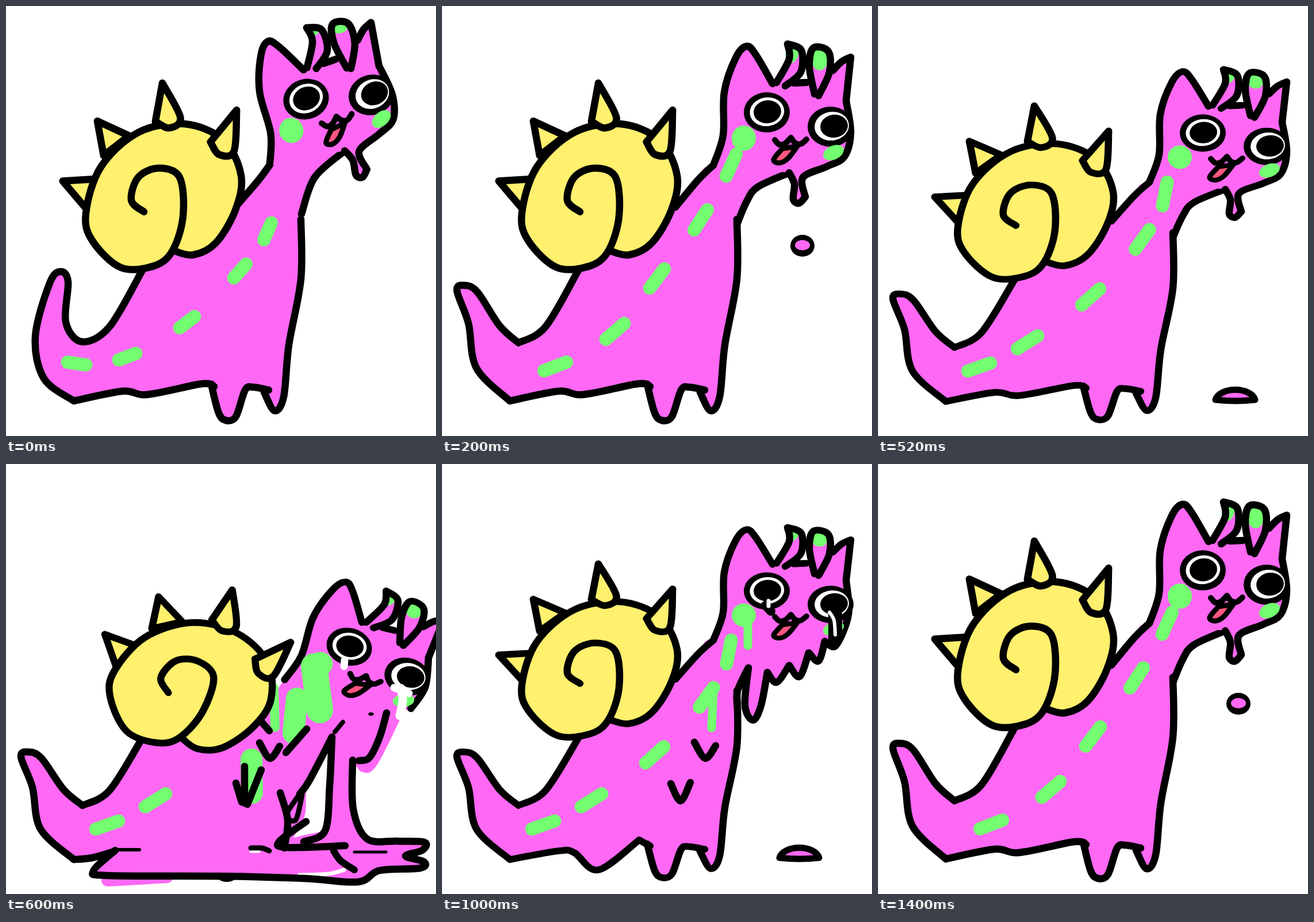
Recreate the animation shown at these times as an HTML page. Size 748 px wide and 748 px high, loop 1600 ms.

```html
<!DOCTYPE html>
<html lang="en">
<head>
<meta charset="utf-8">
<title>Melting snail cat</title>
<style>
  html, body { margin: 0; width: 100%; height: 100%; overflow: hidden; background: #fff; }
  svg { display: block; width: 100%; height: 100%; }
  .line { fill: none; stroke-linecap: round; stroke-linejoin: round; }
</style>
</head>
<body>
<svg id="stage" viewBox="0 0 748 748"></svg>
<script>
const INK = '#000', PINK = '#ff68f4', YELLOW = '#fff06e', GREEN = '#73ff70', RED = '#ff5780', WHITE = '#fff';

const points = s => s.trim().split(/\s+/).map(q => q.split(',').map(Number));

// Smooth curve through "x,y" points; "/" makes a sharp corner.
function curve(text) {
  let d = '', last;
  for (const part of text.split('/')) {
    const p = points(part);
    if (last) p.unshift(last); else d = 'M' + p[0];
    for (let i = 1; i < p.length; i++) {
      const b = p[i - 1], c = p[i], a = p[i - 2] || b, e = p[i + 1] || c;
      const h1 = b.map((v, k) => v + (c[k] - a[k]) / 6);
      const h2 = c.map((v, k) => v - (e[k] - b[k]) / 6);
      d += `C${h1} ${h2} ${c}`;
    }
    last = p[p.length - 1];
  }
  return d;
}

const line = (s, w = 12.5, color = INK) =>
  `<path class="line" d="${curve(s)}" stroke="${color}" stroke-width="${w}"/>`;
const lines = list => list.map(s => line(s)).join('');
const blob = (s, color) => `<path d="${curve(s)}Z" fill="${color}"/>`;
const smear = (s, w) => line(s, w, GREEN);
const oval = (x, y, rx, ry, color, turn = 0) =>
  `<ellipse cx="${x}" cy="${y}" rx="${rx}" ry="${ry}" fill="${color}" transform="rotate(${turn} ${x} ${y})"/>`;
const place = (transform, inner) => `<g transform="${transform}">${inner}</g>`;

// Sagging poses press the drawing towards the ground.
const PRESS = .93, FLOOR = 49;
const SAG = `translate(0 ${FLOOR}) scale(1 ${PRESS})`;
const mapY = (s, fn) => s.replace(/,([\d.]+)/g, (_, y) => ',' + fn(+y).toFixed(1));
const squash = s => mapY(s, y => y * PRESS + FLOOR);
const lift = s => mapY(s, y => (y - FLOOR) / PRESS);

// One dash centred on each point of the spine, lying along it.
function stripes(spine, length = 42) {
  const p = points(spine);
  const bend = (a, b, c) => a.map((v, k) => 3 * v - 3 * b[k] + c[k]);
  const path = [bend(p[0], p[1], p[2]), ...p, bend(...p.slice(-3).reverse())];
  return p.map(([x, y], i) => {
    const [a, b] = [path[i], path[i + 2]];
    const angle = Math.atan2(b[1] - a[1], b[0] - a[0]);
    const dx = Math.cos(angle) * length / 2, dy = Math.sin(angle) * length / 2;
    return smear(`${x - dx},${y - dy} ${x + dx},${y + dy}`, 23);
  }).join('');
}

// Shell: a spiral with four spikes spread evenly over its back.
function polar(degrees, r) {
  const a = degrees * Math.PI / 180;
  return [272 + r * Math.cos(a), 335 + r * Math.sin(a)];
}

function spike(i) {
  const front = i > 1;
  const [tx, ty] = polar(190 + 40 * i, front ? 201 : 176);
  const [bx, by] = polar(184 + 45 * i, front ? 138 : 122);
  const size = Math.hypot(tx - bx, ty - by), half = front ? 22 : 28;
  const ux = (tx - bx) / size, uy = (ty - by) / size;
  const at = (side, back) => `${bx - uy * side - ux * back},${by + ux * side - uy * back}`;
  const base = front ? `${at(half, 0)} ${at(0, 15)} ${at(-half, 0)}` : `${at(half, 0)}/${at(-half, 0)}`;
  const s = `${tx},${ty}/${base}/${tx},${ty}`;
  return blob(s, YELLOW) + line(s);
}

const rim = '308,365 290,425 258,452 200,455 150,408 139,360 165,280 230,220 310,205 378,233 409,295 399,355 365,412 325,433 290,425';
const spiral = '240,358 218,338 230,298 266,282 302,298 ' + rim;
const shell = spike(0) + spike(1) + blob(rim, YELLOW) + line(spiral) + spike(2) + spike(3);

// Head: one drawing, tilted differently in each pose.
const crown = [
  '703,165 711,89/695,97 680,112',
  '655,156 674,115 672,79 646,73 639,105 648,153',
  '634,133 612,134',
  '597,139 624,115 625,77 601,66/604,92 582,133',
  '575,135 546,85 530,70 511,90 491,150 489,225 472,277'
];
const drip = '604,290 613,310 611,336 621,343 632,332/628,298 670,279 700,262 711,220 703,165';

const eye = (x, y, look) => oval(x, y, 40, 35, INK) +
  oval(x + look / 3, y - 1, 30, 25, WHITE, -8) + oval(x + look, y - 1, 24, 20, INK, -8);

function head(tip, jaw = drip) {
  const outline = [jaw, ...crown];
  const lips = '579,233 587,241 597,239 607,229/614,238 624,240 634,232';
  const tongue = '592,248 577,267 587,273 602,265 618,244/592,248';
  return blob(outline.join('/'), PINK) +
    oval(609, 69 + tip * .7, 11, tip * .9, GREEN, 10) + oval(657, 74 + tip, 14, tip, GREEN) +
    lines(outline) + eye(565, 185, 1) + eye(676, 210, 6) +
    oval(525, 230, 21, 22, GREEN) + oval(681, 255, 19, 12, GREEN, -25) +
    blob(tongue, RED) + line(tongue, 9) + line(lips, 10);
}

const raisedTail = '237,460 180,558 132,584 104,550 108,480 95,462 76,482 51,575 66,648 118,687';
const limpTail = '237,460 180,558 133,586/100,556 62,498 40,486 26,495 46,552 60,630 118,687';
const flatBelly = '118,687 203,670 245,676 335,658 357,658';
const legs = [
  '357,658 370,708 383,721 400,714 416,668 430,663 457,668',
  '449,672 467,704 483,680 492,590 513,475 513,371'
];

function body(tail, front, back, belly = flatBelly) {
  const parts = [tail, belly, ...legs, front, back];
  return blob(parts.join('/'), PINK) + lines(parts) + line('357,658 362,662');
}

const slump = (front, belly) => body(limpTail, front, '472,277 445,303 406,350', belly);
const limpNeck = '513,380 530,340 549,315 604,290';
const sagSpine = '176,628 260,585 370,506 460,406 499,327';

const puddle = `<path class="line" d="M587 685A35 21 0 0 1 656 685Q622 689 587 685Z"
  style="fill:${PINK}" stroke="${INK}" stroke-width="11"/>`;

const upright = body(raisedTail, '514,362 537,298 589,252', '459,276 440,302 404,344') + shell +
  place('translate(-43 -23) rotate(-16.4 565 185)', head(9)) +
  stripes('123,622 211,610 315,550 407,461 455,392', 32);

const dripping = slump(limpNeck) + shell + head(19) +
  stripes('197,627 301,566 374,474 450,372 503,277') +
  oval(627, 417, 21, 19, INK) + oval(627, 416, 13, 9, PINK);

const sagging = place(SAG, slump(limpNeck) + shell + head(14)) + stripes(sagSpine) + puddle;

const runnyNeck = lift('514,425 514,395 533,354/527,420 541,446 555,420 566,362');
const runnyJaw = lift('566,362/582,380 604,350/622,370 638,328/655,343 666,308/685,316 707,262 703,202');
const bulge = lift('118,688 203,673 230,676 272,706 343,654/357,662');

const weeping = place(SAG, slump(runnyNeck, bulge) + shell + head(14, runnyJaw)) + stripes(sagSpine) +
  line('563,246 572,256', 16) + line('568,238 568,247', 7, WHITE) +
  line('684,262 684,306', 24) + line('674,258 682,272 684,297', 6, WHITE) +
  smear('532,280 532,316', 15) + smear('472,395 469,459', 15) +
  line('439,484 458,512 476,490') + line('398,556 415,586 432,554') + puddle;

function collapsed() {
  const tail = squash(limpTail);
  const pool = '190,672 152,708 180,716 375,717 520,721 612,727 650,707 720,703 727,692 695,682 724,672 728,658 680,656 628,652 604,600 603,515';
  const spill = '620,536 645,524 690,435/540,330/484,375/440,440/300,460/237,478';
  return line('177,724 280,718', 22, PINK) + blob([tail, '190,672', pool, spill].join('/'), PINK) +
    // gaps the melted body leaves open
    blob('566,480 563,560 556,638/522,645/500,650/520,610 526,550 566,480', WHITE) +
    line('510,715 560,713 588,706', 7, WHITE) + line('426,674 440,674', 5, WHITE) +
    lines([tail, '118,688 150,685 188,674', pool, '567,475 563,560 555,638 518,657',
      '567,475 528,550 511,574', '522,622 475,657 490,667 590,664', '477,572 490,620 484,668']) +
    line('511,574 488,610 504,619 515,576', 9) +
    line('190,671 232,671', 6) + line('426,668 445,668 458,673', 9) + line('606,675 661,675', 5) +
    line('570,673 582,690 606,706', 12) + oval(384, 719, 15, 8, INK) +
    place('translate(98.6 1) rotate(15.5) scale(1 .93)', head(14)
      .replace(line(drip), line('697,266 711,220 703,165'))) +
    smear('536,352 546,428', 46) + smear('506,408 500,468', 38) +
    smear('466,390 468,458', 16) + smear('427,514 428,572', 38) +
    stripes(sagSpine.split(' ').slice(0, 3).join(' ')).split('/>').slice(0, 2).join('/>') + '/>' +
    place('translate(192.8 -2.8) rotate(23.2) scale(1 .93)', shell) +
    lines(['444,448 458,464', '523,461 487,502', '441,485 459,512 476,491', '400,555 410,588',
      '415,526 415,590', '444,532 420,592', '662,433 650,475 632,511 614,516']) +
    line('572,466 586,449', 8) + oval(635, 435, 5, 3, INK) +
    line('589,341 588,352', 13, WHITE) +
    line('675,389 701,399', 13, WHITE) + line('687,390 690,412 685,438', 15, WHITE);
}

const poses = { upright, dripping, sagging, collapsed: collapsed(), weeping };
const beats = 'upright dripping sagging collapsed collapsed weeping sagging dripping'.split(' ');
const BEAT = 200;

const stage = document.getElementById('stage');
stage.innerHTML = Object.entries(poses)
  .map(([name, art]) => `<g id="${name}">${art}</g>`).join('');

function draw() {
  const now = beats[Math.floor(performance.now() / BEAT) % beats.length];
  for (const pose of stage.children) pose.style.display = pose.id === now ? '' : 'none';
  requestAnimationFrame(draw);
}
draw();
</script>
</body>
</html>
```
